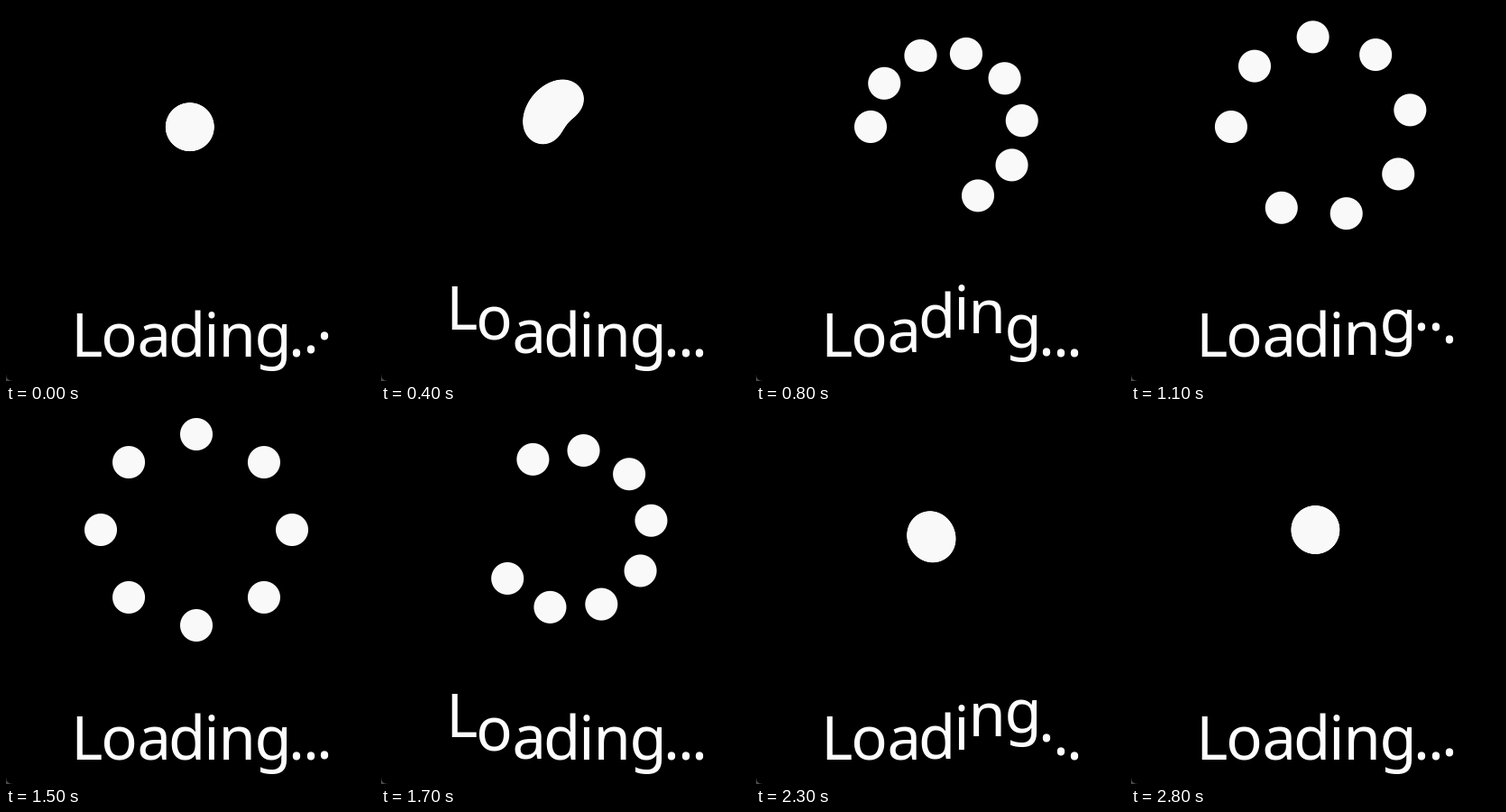
An HTML page with a canvas for the animation above (2.9 s loop, 409 px wide and 416 px high).

```html
<!DOCTYPE html>
<html lang="en">
<head>
<meta charset="utf-8">
<title>Loading</title>
<style>
  html, body { margin: 0; width: 100%; height: 100%; overflow: hidden; background: #000; }
  canvas, svg { position: absolute; left: 0; top: 0; display: block; }
  text { font: 67px "Noto Sans", "Open Sans", sans-serif; fill: #fdfdfd; text-anchor: middle; }
</style>
</head>
<body>
<canvas id="ring" width="409" height="270"></canvas>
<svg id="label" width="409" height="416" viewBox="0 0 409 416">
  <path d="M0 408Q0 416 8 416H0Z" fill="#4a4a4a"/>
</svg>
<script>
const LOOP = 2900, STEP = 100;
const START = 154, WAVE = 1353, RISE = WAVE / 5, STAGGER = WAVE / 15, JUMP = 30;
const CX = 211, CY = 134, DOTS = 8, R_MIN = 6.5, R_MAX = 106;
const DOT = 18, SPREAD = 97.4; // dot radius, variance of its soft field

const ctx = document.getElementById('ring').getContext('2d');
const image = ctx.createImageData(409, 270);
const label = document.getElementById('label');

const centres = [89.8, 125.5, 164.3, 200.5, 228, 256.3, 296, 322, 338, 353];
const letters = [...'Loading...'].map((char, i) => {
  const el = document.createElementNS('http://www.w3.org/2000/svg', 'text');
  el.textContent = char;
  el.setAttribute('x', centres[i]);
  label.append(el);
  return el;
});

const mod = (a, n) => ((a % n) + n) % n;

function bezier(x1, y1, x2, y2) {
  const at = (a, b, s) => 3 * a * s * (1 - s) ** 2 + 3 * b * s * s * (1 - s) + s ** 3;
  return x => {
    let lo = 0, hi = 1;
    for (let k = 0; k < 24; k++) {
      const mid = (lo + hi) / 2;
      if (at(x1, x2, mid) < x) lo = mid; else hi = mid;
    }
    return at(y1, y2, lo);
  };
}
const ease = bezier(.25, .1, .25, 1);
const easeInOut = bezier(.42, 0, .58, 1);

// Dots fan out from one point, then gather again at the end of a full turn.
function dotsAt(t) {
  const phase = mod((t - START) / WAVE, 2);
  const opening = phase < 1;
  const open = opening ? ease(phase) : 1 - ease(phase - 1);
  const r = R_MIN + (R_MAX - R_MIN) * open;
  return Array.from({ length: DOTS }, (_, i) => {
    const a = Math.PI + (opening ? i : i - DOTS) * open * 2 * Math.PI / DOTS;
    return [CX + r * Math.cos(a), CY + r * Math.sin(a)];
  });
}

// Metaballs: sum the soft fields and cut at a lone dot's edge.
function drawDots(dots) {
  const { width, height, data } = image;
  for (let y = 0, p = 0; y < height; y++) {
    for (let x = 0; x < width; x++, p += 4) {
      let sum = 0;
      for (const [dx, dy] of dots) {
        const d2 = (x + .5 - dx) ** 2 + (y + .5 - dy) ** 2;
        if (d2 < 2500) sum += Math.exp((DOT * DOT - d2) / (2 * SPREAD));
      }
      const cover = sum ? Math.min(1, Math.max(0, .5 + Math.log(sum) * SPREAD / DOT)) : 0;
      data[p] = data[p + 1] = data[p + 2] = 249 * cover;
      data[p + 3] = 255;
    }
  }
  ctx.putImageData(image, 0, 0);
}

function lift(t, i) {
  const u = mod(t - START - i * STAGGER, WAVE) / RISE;
  if (u >= 2) return 0;
  return JUMP * (u < 1 ? easeInOut(u) : 1 - easeInOut(u - 1));
}

function draw(t) {
  drawDots(dotsAt(t));
  letters.forEach((el, i) => el.setAttribute('y', (388.5 - lift(t, i)).toFixed(2)));
}

let shown = -1;
const begin = performance.now();
function tick() {
  const t = Math.floor(mod(performance.now() - begin, LOOP) / STEP) * STEP;
  if (t !== shown) draw(shown = t);
  requestAnimationFrame(tick);
}
tick();
</script>
</body>
</html>
```
